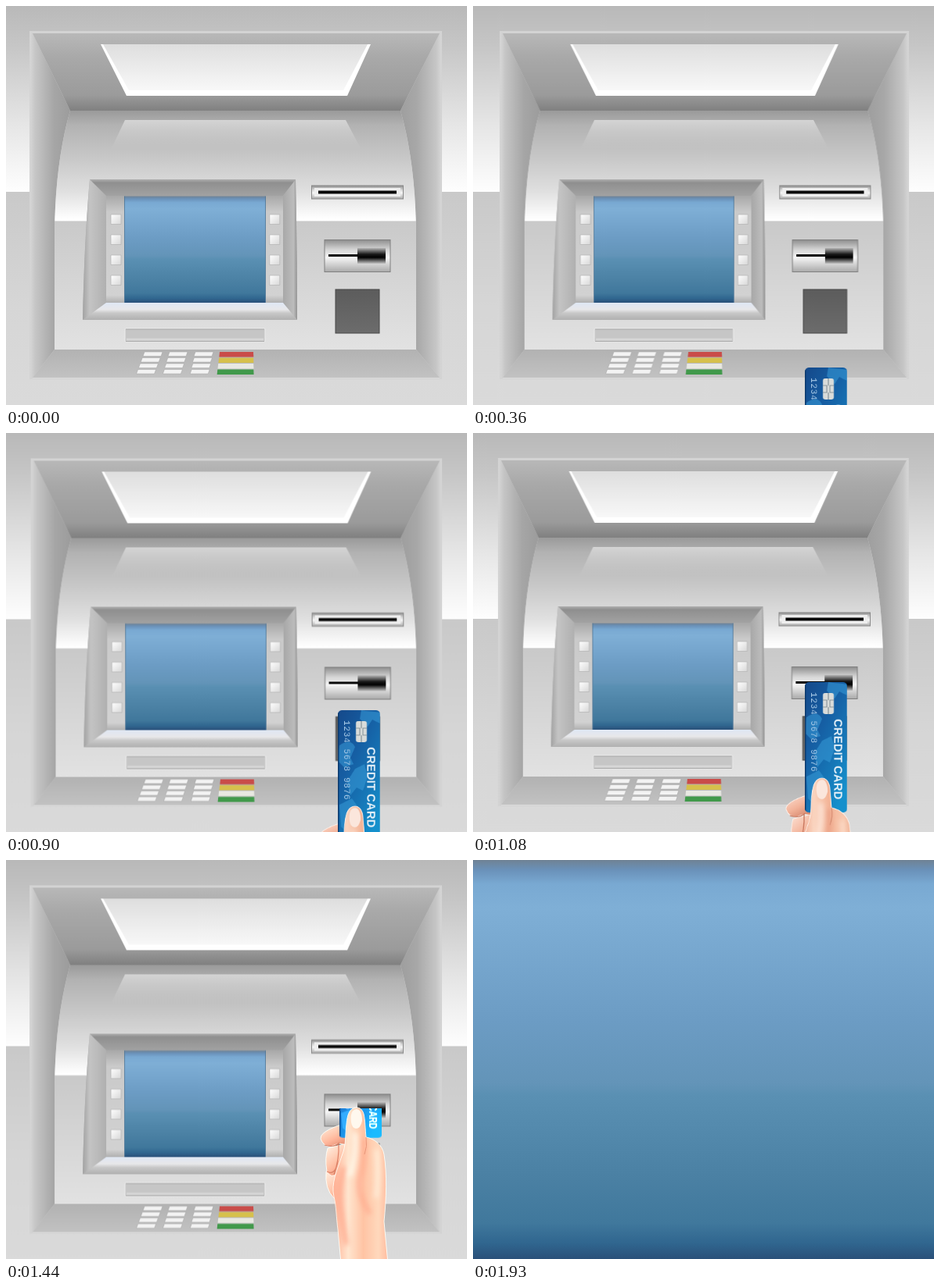
An HTML page that plays this animation: 589x511 px, repeating every 2.33 s.

```html
<!DOCTYPE html>
<html lang="en">
<head>
<meta charset="utf-8">
<title>Cash machine</title>
<style>
  html, body { margin: 0; width: 100%; height: 100%; overflow: hidden; background: #ccc; }
  svg { display: block; width: 100%; height: 100%; }
  .zoom, .machine, .hand, .card, .blue { animation: 2330ms step-end infinite; }
  .zoom { animation-name: zoom; }
  .machine { animation-name: drift; }
  .hand { animation-name: hand; }
  .card { animation-name: card; transform-origin: 0 486px; }
  .blue { animation-name: blue; }

  @keyframes zoom {
    0% { transform: none; }
    65.66%, 100% { transform: matrix(1.365, 0, 0, 1.36, -66.5, -166.2); }
  }
  @keyframes drift {
    0% { transform: translate(0, 0) scaleX(1); animation-timing-function: steps(4); }
    15.45% { transform: translate(4.2px, 0) scaleX(.9925); animation-timing-function: steps(4); }
    30.9% { transform: translate(1.3px, 1px) scaleX(.9985); animation-timing-function: steps(4); }
    46.35% { transform: translate(2px, 0) scaleX(.996); animation-timing-function: steps(2); }
    54.07%, 100% { transform: translate(0, .4px) scaleX(1); }
  }
  @keyframes hand {
    0% { transform: translate(0, 216px); filter: brightness(1); animation-timing-function: steps(12); }
    46.35% { transform: translate(0, 0); filter: brightness(1); animation-timing-function: steps(2); }
    54.07% { transform: translate(-3px, -78px); filter: brightness(1.04); animation-timing-function: steps(2); }
    61.8%, 100% { transform: translate(2px, -125px); filter: brightness(1.08); }
  }
  /* The card foreshortens as it slides in. */
  @keyframes card {
    0% { transform: translate(0, 216px) scaleY(1); filter: brightness(1); animation-timing-function: steps(12); }
    46.35% { transform: translate(0, 0) scaleY(1); filter: brightness(1); animation-timing-function: steps(2); }
    54.07% { transform: translate(-3px, -79px) scaleY(.88); filter: brightness(1.2); animation-timing-function: steps(2); }
    61.8%, 100% { transform: translate(2px, -130px) scaleY(.7); filter: brightness(1.3); }
  }
  @keyframes blue {
    0% { opacity: 0; }
    82.83%, 100% { opacity: 1; }
  }
</style>
</head>
<body>
<svg viewBox="0 0 589 511" preserveAspectRatio="none">
  <defs>
    <linearGradient id="wall" x2="0" y2="1">
      <stop offset="0" stop-color="#b9b9b9"/><stop offset=".1" stop-color="#c6c6c6"/>
      <stop offset=".3" stop-color="#e6e6e6"/><stop offset=".46" stop-color="#fdfdfd"/>
      <stop offset=".465" stop-color="#fdfdfd"/><stop offset=".466" stop-color="#c9c9c9"/>
      <stop offset=".75" stop-color="#d6d6d6"/><stop offset="1" stop-color="#dadada"/>
    </linearGradient>
    <linearGradient id="top" x2="0" y2="1">
      <stop offset="0" stop-color="#b8b8b8"/><stop offset=".3" stop-color="#a9a9a9"/>
      <stop offset=".8" stop-color="#9b9b9b"/><stop offset="1" stop-color="#808080"/>
    </linearGradient>
    <linearGradient id="left" gradientUnits="userSpaceOnUse" x1="30" x2="82">
      <stop offset="0" stop-color="#d8d8d8"/><stop offset=".14" stop-color="#c6c6c6"/>
      <stop offset=".6" stop-color="#a6a6a6"/><stop offset="1" stop-color="#9c9c9c"/>
    </linearGradient>
    <linearGradient id="right" gradientUnits="userSpaceOnUse" x1="557" x2="504">
      <stop offset="0" stop-color="#d8d8d8"/><stop offset=".14" stop-color="#c6c6c6"/>
      <stop offset=".6" stop-color="#a8a8a8"/><stop offset="1" stop-color="#9e9e9e"/>
    </linearGradient>
    <linearGradient id="panel" gradientUnits="userSpaceOnUse" x1="0" x2="0" y1="134" y2="440">
      <stop offset="0" stop-color="#9a9a9a"/><stop offset=".06" stop-color="#b2b2b2"/>
      <stop offset=".2" stop-color="#c8c8c8"/><stop offset=".34" stop-color="#e0e0e0"/>
      <stop offset=".455" stop-color="#fff"/><stop offset=".46" stop-color="#fff"/>
      <stop offset=".464" stop-color="#c9c9c9"/><stop offset=".65" stop-color="#d2d2d2"/>
      <stop offset="1" stop-color="#e2e2e2"/>
    </linearGradient>
    <linearGradient id="glow" x2="0" y2="1">
      <stop offset="0" stop-color="#dcdcdc" stop-opacity=".85"/><stop offset="1" stop-color="#d4d4d4" stop-opacity="0"/>
    </linearGradient>
    <linearGradient id="lamp" x2="0" y2="1">
      <stop offset="0" stop-color="#dedede"/><stop offset="1" stop-color="#f8f8f8"/>
    </linearGradient>
    <linearGradient id="shelf" x2="0" y2="1">
      <stop offset="0" stop-color="#b2b2b2"/><stop offset="1" stop-color="#c2c2c2"/>
    </linearGradient>
    <linearGradient id="bezelTop" x2="0" y2="1">
      <stop offset="0" stop-color="#b0b0b0"/><stop offset=".2" stop-color="#8f8f8f"/><stop offset="1" stop-color="#a2a2a2"/>
    </linearGradient>
    <linearGradient id="bezelLeft">
      <stop offset="0" stop-color="#a2a2a2"/><stop offset=".3" stop-color="#c4c4c4"/><stop offset="1" stop-color="#b0b0b0"/>
    </linearGradient>
    <linearGradient id="bezelRight">
      <stop offset="0" stop-color="#a8a8a8"/><stop offset=".75" stop-color="#bcbcbc"/><stop offset="1" stop-color="#929292"/>
    </linearGradient>
    <linearGradient id="bezelBottom" x2="0" y2="1">
      <stop offset="0" stop-color="#dfe7f4"/><stop offset=".4" stop-color="#e8e8ea"/>
      <stop offset=".6" stop-color="#c8c8c8"/><stop offset="1" stop-color="#b0b0b0"/>
    </linearGradient>
    <linearGradient id="column" x2="0" y2="1">
      <stop offset="0" stop-color="#a8a8a8"/><stop offset=".15" stop-color="#cacaca"/>
      <stop offset=".93" stop-color="#d2d2d2"/><stop offset="1" stop-color="#b0b0b0"/>
    </linearGradient>
    <linearGradient id="key" x2="1" y2="1">
      <stop offset="0" stop-color="#fff"/><stop offset="1" stop-color="#d8d8d8"/>
    </linearGradient>
    <linearGradient id="screen" x2="0" y2="1">
      <stop offset="0" stop-color="#6f8294"/><stop offset=".025" stop-color="#6a91b9"/>
      <stop offset=".06" stop-color="#79a9d2"/><stop offset=".12" stop-color="#7fafd6"/>
      <stop offset=".4" stop-color="#6c9cc4"/><stop offset=".56" stop-color="#6394b8"/>
      <stop offset=".59" stop-color="#5a90b3"/><stop offset=".8" stop-color="#4a80a3"/>
      <stop offset=".91" stop-color="#40789c"/><stop offset=".96" stop-color="#30668f"/>
      <stop offset="1" stop-color="#2a5079"/>
    </linearGradient>
    <linearGradient id="metal" x2="0" y2="1">
      <stop offset="0" stop-color="#8e8e8e"/><stop offset=".3" stop-color="#d4d4d4"/>
      <stop offset=".55" stop-color="#f6f6f6"/><stop offset="1" stop-color="#aaa"/>
    </linearGradient>
    <linearGradient id="hole" x2="0" y2="1">
      <stop offset="0" stop-color="#b4b4b4"/><stop offset=".4" stop-color="#181818"/>
      <stop offset=".6" stop-color="#000"/><stop offset="1" stop-color="#c4c4c4"/>
    </linearGradient>
    <linearGradient id="reader" x2="0" y2="1">
      <stop offset="0" stop-color="#5c5c5c"/><stop offset="1" stop-color="#6c6c6c"/>
    </linearGradient>
    <linearGradient id="cardFill" x2=".7" y2="1">
      <stop offset="0" stop-color="#15498a"/><stop offset=".4" stop-color="#165ea3"/>
      <stop offset=".75" stop-color="#1678b8"/><stop offset="1" stop-color="#1590cc"/>
    </linearGradient>
    <linearGradient id="skin">
      <stop offset="0" stop-color="#eda288"/><stop offset=".25" stop-color="#fad4bf"/>
      <stop offset=".5" stop-color="#f4b598"/><stop offset=".75" stop-color="#f8c8ae"/><stop offset="1" stop-color="#e79f84"/>
    </linearGradient>
    <linearGradient id="finger" x2=".6" y2="1">
      <stop offset="0" stop-color="#fde4d8"/><stop offset=".6" stop-color="#f3b49b"/><stop offset="1" stop-color="#d88a70"/>
    </linearGradient>
    <filter id="soft" x="-50%" y="-50%" width="200%" height="200%"><feGaussianBlur stdDeviation="3"/></filter>
    <clipPath id="belowSlot"><path d="M0 318H589V800H0z"/></clipPath>
    <clipPath id="cardShape"><rect x="424" y="319" width="54" height="167" rx="5"/></clipPath>
  </defs>

  <g class="zoom">
    <g class="machine">
      <rect x="-10" width="609" height="511" fill="url(#wall)"/>
      <path d="M30 32H557V478H30z" fill="#d3d3d3"/>
      <path d="M34 35L82 134Q63 200 62 290V440L34 476L31 477V33z" fill="url(#left)"/>
      <path d="M554 35L504 134Q523 200 524 290V440L554 476L556 477V33z" fill="url(#right)"/>
      <path d="M34 35H554L504 134H82z" fill="url(#top)"/>
      <path d="M62 440H524L554 476H34z" fill="url(#shelf)"/>
      <path d="M34 476.500H554" stroke="#dcdcdc"/>
      <path d="M82 134Q63 200 62 290V440H524V290Q523 200 504 134z" fill="url(#panel)"/>
      <path d="M152 146H434L454 184H134z" fill="url(#glow)"/>
      <path d="M121 49H466L436 115H154z" fill="#fff"/>
      <path d="M124 49H462L431 108H157z" fill="url(#lamp)"/>

      <path d="M107 222H370Q372 310 372 402H98Q100 300 107 222z" fill="#b4b4b4"/>
      <path d="M107 222L128 243V381L98 402Q100 300 107 222z" fill="url(#bezelLeft)"/>
      <path d="M370 222L354 243V381L372 402Q372 310 370 222z" fill="url(#bezelRight)"/>
      <path d="M107 222H370L354 243H128z" fill="url(#bezelTop)"/>
      <path d="M128 380H354L372 402H98z" fill="url(#bezelBottom)"/>
      <rect x="128" y="243" width="226" height="137" fill="url(#column)"/>
      <rect x="151.500" y="243.500" width="180" height="136.500" fill="url(#screen)"/>
      <path d="M151.500 243.500V380M331.500 243.500V380" stroke="#3d6a90" stroke-width=".7"/>
      <g id="buttons" fill="url(#key)" stroke="#b4b4b4" stroke-width=".7"></g>

      <rect x="152" y="413" width="179" height="17" rx="1" fill="#c6c6c6" stroke="#ececec"/>
      <path d="M153 429.500H330M153 414H330" stroke="#acacac"/>
      <path d="M154 427H329" stroke="#d6d6d6" stroke-width="3"/>

      <rect x="390.500" y="230" width="117" height="17" fill="url(#metal)" stroke="#8a8a8a"/>
      <rect x="394" y="233" width="110" height="11" fill="#eee"/>
      <rect x="399" y="236.500" width="100" height="4" fill="#0a0a0a"/>

      <rect x="407" y="299.500" width="84" height="41" fill="url(#metal)" stroke="#808080"/>
      <rect x="449" y="310" width="36" height="20" fill="url(#hole)"/>
      <rect x="412" y="318" width="38" height="3" fill="#0a0a0a"/>

      <rect x="421" y="363" width="56" height="56" fill="url(#reader)" stroke="#484848"/>
      <g id="keypad"></g>
    </g>

    <g class="hand">
      <g transform="translate(3 78)" fill="url(#finger)" stroke="#fff3ec" stroke-width=".8">
        <path d="M426 440L404 446Q402 468 414 480L440 486V440z"/>
        <path d="M430 410L406 416Q402 428 405 446Q411 456 418 448L434 430z"/>
        <path d="M430 384L417 388Q396 396 397 404Q400 413 409 414L420 410L432 412z"/>
        <path d="M402 412Q414 416 421 409M405 446Q416 452 419 432M420 410Q421 430 414 450" fill="none" stroke="#c9775e" stroke-width="1.200"/>
      </g>
    </g>

    <g clip-path="url(#belowSlot)">
      <g class="card">
        <g clip-path="url(#cardShape)">
          <rect x="424" y="319" width="54" height="167" fill="url(#cardFill)"/>
          <g fill="#3a9bd8" opacity=".55">
            <path d="M454 319L478 322V336L468 331L462 340L452 330z"/>
            <path d="M426 364Q440 354 446 366L440 380L444 388L432 392L424 384z"/>
            <path d="M446 394L458 388L462 404L456 422L448 418L440 428L436 410z"/>
            <path d="M426 440L442 432L452 446L458 470L440 480L428 468z"/>
          </g>
          <path d="M424.700 322V484" stroke="#0d3a6c" stroke-width="1.400"/>
        </g>
        <rect x="447" y="333" width="14" height="27" rx="3" fill="#d9dcda"/>
        <path d="M447 342H452V351H447M461 342H456V351H461M454 333V342M454 351V360" fill="none" stroke="#7e8c94"/>
        <text transform="translate(432 332) rotate(90)" font-family="'Liberation Mono', monospace" font-size="11" letter-spacing=".7" fill="#a9cbe8">1234 5678 9876</text>
        <text transform="translate(461.500 366) rotate(90)" font-family="'Liberation Sans', sans-serif" font-weight="bold" font-size="15" fill="#e4f0f8">CREDIT CARD</text>
      </g>
    </g>

    <g class="hand">
      <g transform="translate(3 78)">
        <path d="M443 364C434 364 431 373 430 385C428 400 430 412 424 426C418 444 410 462 414 478C417 490 417 505 419 520L430 640H490L478 510C481 480 482 450 478 424C476 412 466 404 455 402C454 392 454 380 452 372C450 366 447 364 443 364z" fill="url(#skin)" stroke="#fff3ec" stroke-width=".8"/>
        <g fill="none" filter="url(#soft)" stroke-width="6" opacity=".75">
          <path d="M441 396Q444 424 434 452" stroke="#fff0e6"/>
          <path d="M427 440Q419 466 422 490T430 540" stroke="#e5957a"/>
          <path d="M452 404Q454 432 448 452T460 500" stroke="#e89c82"/>
          <path d="M468 418Q472 446 468 480" stroke="#fde0cf"/>
        </g>
        <path d="M436 383Q434 367 443 366Q450 367 450 381Q448 391 442 391Q437 390 436 383z" fill="#fbe6dc"/>
        <path d="M455 402Q457 414 453 424" fill="none" stroke="#d58b70"/>
      </g>
    </g>
  </g>

  <rect class="blue" width="589" height="511" fill="url(#screen)"/>
</svg>
<script>
  const add = (id, attrs) => {
    const path = document.createElementNS("http://www.w3.org/2000/svg", "path");
    for (const name in attrs) path.setAttribute(name, attrs[name]);
    document.getElementById(id).append(path);
  };

  for (const x of [134, 336.8])
    for (let row = 0; row < 4; row++)
      add("buttons", { d: `M${x} ${267 + row * 26}h13v12.500h-13z` });

  // Each row of the keypad leans a little further left.
  const columns = [[177, 2.8], [209, 2.2], [242, 1.6]];
  const colours = ["#c94c49", "#d6c04c", "#e8e8e2", "#41994b"];
  colours.forEach((fill, row) => {
    const y = 443 + row * 7.5;
    for (const [x, lean] of columns)
      add("keypad", { d: `M${x - lean * row} ${y}h23l-2 5.500h-23z`, fill: "#f3f3f3", stroke: "#a0a0a0", "stroke-width": .5 });
    add("keypad", { d: `M${273 - row * .9} ${y}h${43 + row}l.3 6.500h${-44 - row}z`, fill });
  });
</script>
</body>
</html>
```
